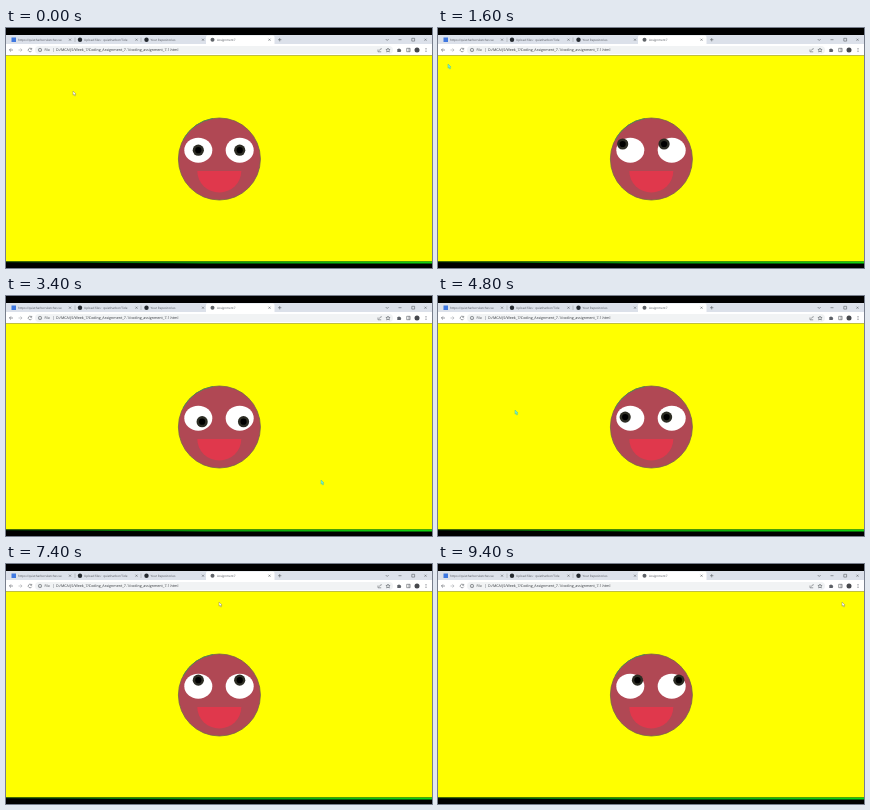
These frames come from a looping animation (426x240 px, 9.47 s). An HTML page:

```html
<!DOCTYPE html>
<html lang="en">
<head>
<meta charset="utf-8">
<title>Assignment7</title>
<style>
  html, body { margin: 0; width: 100%; height: 100%; overflow: hidden; background: #000; }
  svg { display: block; width: 426px; height: 240px; }
  text { font-family: "Open Sans", "Noto Sans", sans-serif; text-rendering: geometricPrecision; }
  .tab { font-size: 3.05px; fill: #50545c; }
  .url { font-size: 3.65px; fill: #30343a; }
  .line { fill: none; stroke: #5c6066; stroke-width: .6; }
  .dim { stroke: #a4a8ae; }
</style>
</head>
<body>
<svg viewBox="0 0 426 240">
  <defs>
    <linearGradient id="strip">
      <stop offset="0" stop-color="#064d06"/>
      <stop offset=".45" stop-color="#0a960a"/>
      <stop offset="1" stop-color="#12d412"/>
    </linearGradient>
    <g id="close"><path class="line" d="M-1-1 1 1M1-1-1 1"/></g>
    <g id="eye"><ellipse rx="14" ry="12.5" fill="#fff"/></g>
    <g id="pupil"><circle r="5.6" fill="#2d2d24"/><circle r="3.1" fill="#000"/></g>
  </defs>

  <rect width="426" height="240" fill="#000"/>
  <rect y="7" width="426" height="9" fill="#dce1ea"/>
  <rect y="16" width="426" height="11.5" fill="#fff"/>
  <path d="M200 16V9q0-1.5 1.5-1.5H267q1.500 0 1.500 1.500V16Z" fill="#fff"/>
  <path class="line dim" d="M69 9.500v4.500M135 9.500v4.500"/>

  <rect x="5.500" y="9.500" width="4.500" height="4.500" fill="#3f78e0"/>
  <circle cx="74" cy="11.700" r="2.200" fill="#24292f"/>
  <circle cx="140.500" cy="11.700" r="2.200" fill="#24292f"/>
  <circle cx="206.500" cy="11.700" r="2" fill="#5f6368"/>
  <text class="tab" x="12" y="12.800">https://quietharborsketches.ve</text>
  <text class="tab" x="78" y="12.800">Upload files · quietharbor/Tide</text>
  <text class="tab" x="144.500" y="12.800">Your Repositories</text>
  <text class="tab" x="211" y="12.800">Assignment7</text>
  <use href="#close" x="64" y="11.700"/>
  <use href="#close" x="130.500" y="11.700"/>
  <use href="#close" x="197" y="11.700"/>
  <use href="#close" x="263.500" y="11.700"/>
  <path class="line" d="M272 11.700h3.400M273.700 10v3.400M379.700 11l1.500 1.500 1.500-1.500M392.500 11.700h3M405.800 10.300h2.800v2.800h-2.800Z"/>
  <use href="#close" x="419.500" y="11.700"/>

  <rect x="29" y="18" width="358" height="8" rx="4" fill="#f1f3f4"/>
  <path class="line" d="M7 22H3.500M5 20.400 3.400 22 5 23.600M25.300 20.700a1.800 1.800 0 1 0 .4 2M25.700 19.900v1.400h-1.400"/>
  <path class="line dim" d="M12.500 22H16M14.500 20.400 16.100 22 14.500 23.600M47.500 20v4"/>
  <circle class="line" cx="34" cy="22" r="1.700"/>
  <path class="line" d="M34 21.800v1M34 20.900v.3"/>
  <text class="url" x="38.500" y="23.300" style="font-size:3.400px">File</text>
  <text class="url" x="50" y="23.300">D:/MCA/JS/Week_7/Coding_Assignment_7.1/coding_assignment_7.1.html</text>
  <path class="line" d="M372 21.500v2.300h3.200M373.500 22.500q.3-1.800 2.300-1.800M382 20l.6 1.400 1.500.1-1.100 1 .3 1.500-1.300-.8-1.300.8.3-1.500-1.100-1 1.500-.1Z"/>
  <path d="M391.300 21h1q.7-1.500 1.400 0h1v1q1.300.7 0 1.400v.7h-3.400Z" fill="#5c6066"/>
  <path class="line" d="M400.700 20.300h3.400v3.400h-3.400ZM403 20.300v3.400"/>
  <circle cx="411" cy="22" r="2.500" fill="#46484c"/>
  <path d="M420 20v.8M420 21.600v.8M420 23.200v.8" stroke="#50545c" stroke-width=".8"/>

  <rect y="27.500" width="426" height="206" fill="#ff0"/>
  <path d="M0 233.500H426V235.600H230Q100 234.900 0 234.300Z" fill="url(#strip)"/>

  <circle cx="213.400" cy="131" r="41" fill="#b04854" stroke="#776449" stroke-width=".8"/>
  <path d="M177 112A41 41 0 0 1 207 90.500" fill="none" stroke="#469252" stroke-width=".8"/>
  <path d="M191.300 143H235.300A22 21.500 0 0 1 191.300 143Z" fill="#e0384c"/>
  <use href="#eye" x="192.300" y="122.200"/>
  <use href="#eye" x="233.700" y="122.200"/>
  <g id="pupils">
    <use href="#pupil" x="192.300" y="122.200"/>
    <use href="#pupil" x="233.700" y="122.200"/>
  </g>
  <path id="cursor" d="M0 0V4.200L1 3.300 1.800 5 2.500 4.700 1.800 3.100H3.100Z" stroke-width=".5"/>
</svg>
<script>
  const LOOP = 9470, STEP = 1000 / 15, WAKE = 130;
  const PAGE = { x: 213, y: 130.5, w: 426, h: 206 };
  const ROOM = { x: 16, y: 13.5 };

  // Pointer path: time, x, y
  const path = [
    [0, 67, 63], [200, 67, 63], [1600, 10, 36], [3400, 315, 184],
    [4800, 77, 114], [6000, 215, 125], [7300, 213, 38],
    [7500, 213, 38], [9300, 404, 38], [LOOP, 404, 38]
  ];
  const pupils = document.getElementById('pupils');
  const cursor = document.getElementById('cursor');

  const ease = u => u * u * (3 - 2 * u);

  function pointer(t) {
    let i = 1;
    while (i < path.length - 1 && t > path[i][0]) i++;
    const [t0, x0, y0] = path[i - 1], [t1, x1, y1] = path[i];
    const u = ease(Math.min(1, Math.max(0, (t - t0) / (t1 - t0))));
    return { x: x0 + (x1 - x0) * u, y: y0 + (y1 - y0) * u };
  }

  function draw(t) {
    const p = pointer(t), q = pointer(Math.max(0, t - 250));
    const moving = Math.hypot(p.x - q.x, p.y - q.y) > 1 && t < 7000;
    const awake = t >= WAKE ? 1 : 0;
    const dx = awake * (p.x - PAGE.x) / PAGE.w * ROOM.x;
    const dy = awake * (p.y - PAGE.y) / PAGE.h * ROOM.y;
    pupils.setAttribute('transform', `translate(${dx} ${dy})`);
    cursor.setAttribute('transform', `translate(${p.x} ${p.y})`);
    cursor.setAttribute('fill', moving ? '#7df0c8' : '#fff');
    cursor.setAttribute('stroke', moving ? '#48c4a0' : '#8c8c50');
  }

  const start = performance.now();
  function tick() {
    const t = (performance.now() - start) % LOOP;
    draw(Math.floor((t + 4) / STEP) * STEP);
    requestAnimationFrame(tick);
  }
  tick();
</script>
</body>
</html>
```
